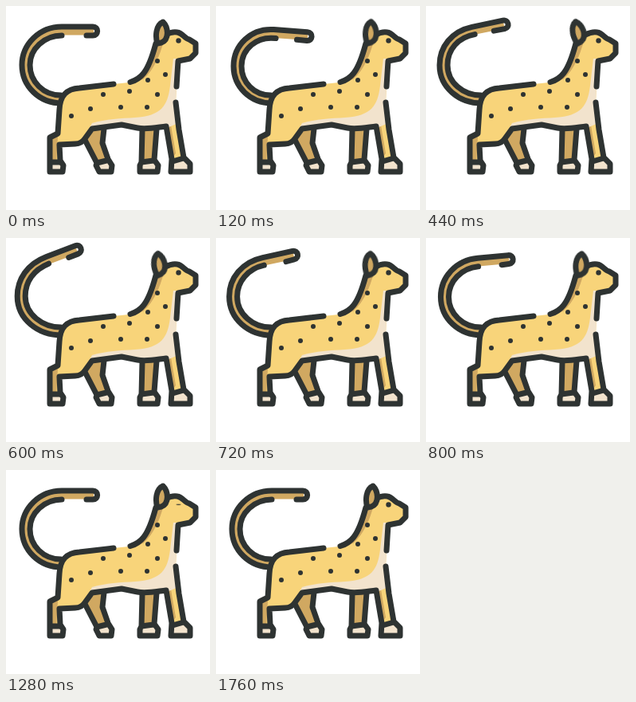
Animation of 256x256 px, one loop 2920 ms. Source, as an HTML page without scripts:

```html
<!DOCTYPE html>
<html lang="en">
<head>
<meta charset="utf-8">
<title>Cheetah</title>
<style>
  :root { --ink: #2e3332; --coat: #f8d47a; --tan: #d0a861; --cream: #f2e3cd; --loop: 2920ms; }
  html, body { margin: 0; width: 100%; height: 100%; overflow: hidden; background: #fff; }
  svg { display: block; width: 100%; height: 100%; }

  .coat { fill: var(--coat); }
  .tan { fill: var(--tan); }
  .cream { fill: var(--cream); }
  .ink { fill: var(--ink); }
  .line { fill: none; }
  .line, .edge { stroke: var(--ink); stroke-width: 7; stroke-linecap: round; stroke-linejoin: round; }
  .fur { fill: none; stroke: var(--tan); stroke-width: 10; }

  .fur, .outer, .inner, .ear, .eye {
    animation: var(--loop) cubic-bezier(.37, 0, .63, 1) infinite;
  }
  .fur { animation-name: fur; }
  .outer { animation-name: outer; }
  .inner { animation-name: inner; }
  .ear { animation-name: ear; transform-origin: 191px 47px; }
  .eye { animation-name: blink; transform-origin: 216.5px 43.5px; }

  /* tail: dips, swings up, settles */
  @keyframes fur {
    0%, 32.88%, 100% { d: path("M110 31.5L70 31.5C45 31.5 25 51 25 74C25 98 45 117 70 117"); }
    8.22% { d: path("M120 44.5L76 38.5C50 34 29 52 29 77C29 99 47 117 70 117"); }
    19.18% { d: path("M88 14L52 28C30 37 19 54 19 73C19 99 44 117 70 117"); animation-timing-function: cubic-bezier(.33, 0, .52, 1); }
  }
  @keyframes outer {
    0%, 32.88%, 100% { d: path("M101 37L109 37C116.5 37 116.5 26 109 26L70 26C42 26 20 48 20 74C20 101 42 122 70 122"); }
    8.22% { d: path("M102 47.5L119 50C126.5 51 128 40.2 120.5 39.2L75 33C46 29 24 50 24 77C24 102 44 122 70 122"); }
    19.18% { d: path("M78 24L90 19.3C97 16.5 93 6.3 86 9.1L50 23.5C26 33 14 52 14 73C14 102 40 122 70 122"); animation-timing-function: cubic-bezier(.33, 0, .52, 1); }
  }
  @keyframes inner {
    0%, 32.88%, 100% { d: path("M70 37C48 37 30 54 30 74C30 95 47 112 69 112"); }
    8.22% { d: path("M80 44C54 38 34 54 34 77C34 97 49 112 69 112"); }
    19.18% { d: path("M53 32C34 40 24 55 24 73C24 96 46 112 69 112"); animation-timing-function: cubic-bezier(.33, 0, .52, 1); }
  }
  @keyframes ear {
    0%, 32.88%, 100% { transform: none; }
    12.33% { transform: rotate(-20deg); }
  }
  @keyframes blink {
    0%, 38.36%, 49.32%, 60.27%, 100% { transform: none; }
    43.84%, 54.79% { transform: scaleY(.22); }
  }
</style>
</head>
<body>
<svg viewBox="0 0 256 256">
  <defs>
    <path id="body" d="M188 47C199 35 207 32 215 33C222 34 224 41 230 42L238 47V59L231 66L216 69L214 101L213 121L217 155L223 190L231 198V208H207L208 192L201 151C185 153 176 155 165 153L145 149L108 154L100 165Q95 173 87 173L67 174L68 194L72 200L71 208H55V165L65 160L67 130C68 112 76 104 92 103L135 98L154 96C161 94 167 92 173 84C180 75 184 62 188 47Z"/>
    <clipPath id="inside"><use href="#body"/></clipPath>
  </defs>

  <!-- tail -->
  <path class="fur" d="M110 31.5L70 31.5C45 31.5 25 51 25 74C25 98 45 117 70 117"/>
  <path class="line outer" d="M101 37L109 37C116.5 37 116.5 26 109 26L70 26C42 26 20 48 20 74C20 101 42 122 70 122"/>
  <path class="line inner" d="M70 37C48 37 30 54 30 74C30 95 47 112 69 112"/>

  <!-- far legs -->
  <path class="tan" d="M106 152L99 168L114 197L128 193L121 172L124 151Z"/>
  <path class="cream" d="M114 197L127 193L133 200L132 208H116Z"/>
  <path class="line" d="M99 168L114 197M123 154L121 172L128 192L133 200L132 208H117L113 200L114 197L126 194"/>
  <path class="tan" d="M171 152L170 197L186 194L190 151Z"/>
  <path class="cream" d="M170 197L186 194L191 200L190 208H168Z"/>
  <path class="line" d="M171 155L170 196L168 200V208H190L191 200L186 193L189 154M170 196L185 194"/>

  <!-- body -->
  <use href="#body" class="coat"/>
  <g clip-path="url(#inside)">
    <path class="tan" d="M52 164H65L63 198H52ZM199 150H207L213 185L208 192Z"/>
    <path class="tan" d="M186 44H198C193 62 186 80 172 92L160 96C175 90 182 70 186 44Z"/>
    <path class="cream" d="M102 158L108 147C125 142 145 141 162 140C195 138 203 125 206 100L210 66H218V146L200 154Z"/>
    <path class="cream" d="M52 196H74V210H52ZM204 196L224 191L234 196V210H204Z"/>
  </g>
  <path class="line" d="M188 47C184 62 180 75 173 84C167 92 161 94 156 95.5"/>
  <path class="line" d="M135 98L92 103C76 104 68 112 67 130L65 160L55 165V208H71L72 200L68 194L67 174L87 173Q95 173 100 165L108 154L145 149L165 153C176 155 185 153 201 151L208 192L207 208H231V198L223 190L217 155L213 121"/>
  <path class="line" d="M57 196H68M209 195L223 191"/>
  <path class="line" d="M200 36C206 33 210 32 215 33C222 34 224 41 230 42L238 47V59L231 66L216 69L214 101"/>

  <path class="tan edge ear" d="M190 47C187 38 188 24 197 20C204 27 205 42 195 46Z"/>
  <circle class="ink eye" cx="216.5" cy="43.5" r="3.2"/>

  <!-- spots -->
  <g class="ink">
    <circle cx="190" cy="69" r="3"/>
    <circle cx="200" cy="86" r="3"/>
    <circle cx="178" cy="93" r="3"/>
    <circle cx="155" cy="107" r="3"/>
    <circle cx="190" cy="111" r="3"/>
    <circle cx="122" cy="111" r="3"/>
    <circle cx="106" cy="129" r="3"/>
    <circle cx="144" cy="127" r="3"/>
    <circle cx="177" cy="127" r="3"/>
    <circle cx="82" cy="138" r="3"/>
  </g>
</svg>
</body>
</html>
```
